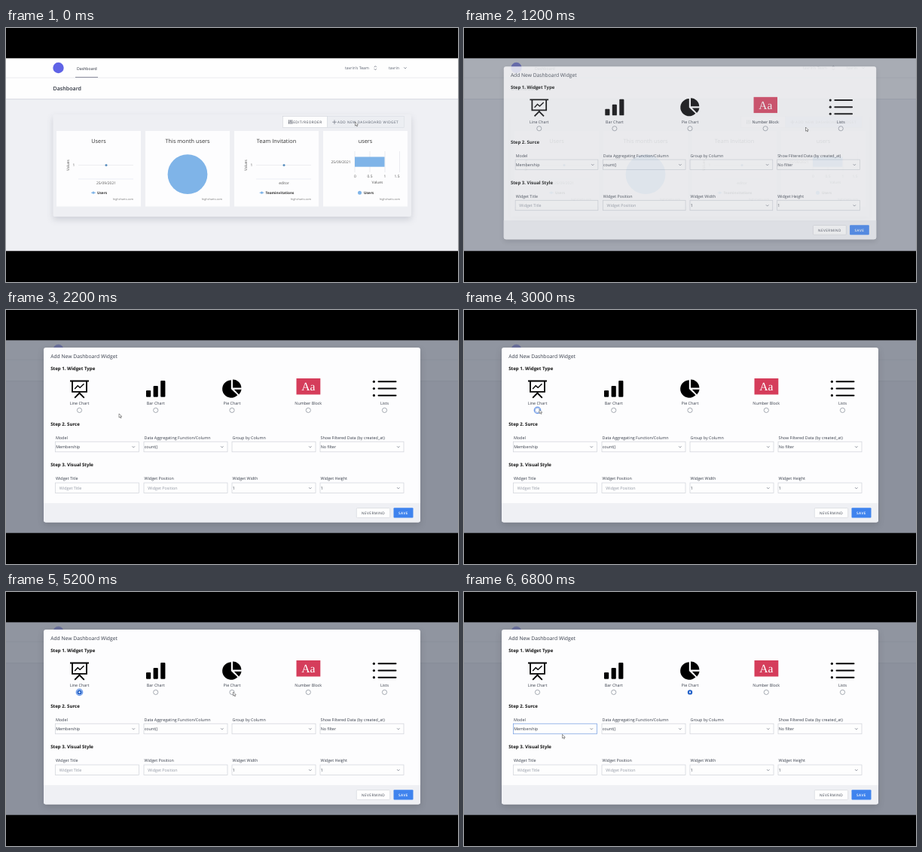
Recreate the animation shown at these times as an HTML page. Size 600 by 338 pixels, loop 8000 ms.

```html
<!DOCTYPE html>
<html lang="en">
<head>
<meta charset="utf-8">
<title>Dashboard widgets</title>
<style>
  html, body { margin: 0; width: 100%; height: 100%; overflow: hidden; background: #000; }
  svg { display: block; width: 600px; height: 338px; }
  text { font-family: "Open Sans", "Noto Sans", sans-serif; text-rendering: geometricPrecision; white-space: pre; }
  .caps { font-size: 4.7px; letter-spacing: .47px; }
  .panel { filter: drop-shadow(0 4px 4px rgba(40, 45, 70, .16)); }
  .sheet { filter: drop-shadow(0 3px 4px rgba(0, 0, 0, .14)); }
</style>
</head>
<body>
<svg id="stage" viewBox="0 0 600 338"></svg>
<script>
const LOOP = 8000, STEP = 200;
const INK = '#363c49', BLUE = '#7fb4e8', LINE = '#cfd2d9';

const text = (x, y, s, size, fill = INK, more = '') =>
  `<text x="${x}" y="${y}" font-size="${size}" fill="${fill}" ${more}>${s}</text>`;
const mid = 'text-anchor="middle"', end = 'text-anchor="end"';
const caps = (x, y, s, fill = INK, more = '') =>
  `<text class="caps" x="${x}" y="${y}" fill="${fill}" ${more}>${s}</text>`;
const rect = (x, y, w, h, fill, more = '') =>
  `<rect x="${x}" y="${y}" width="${w}" height="${h}" fill="${fill}" ${more}/>`;
const circle = (x, y, r, fill, more = '') =>
  `<circle cx="${x}" cy="${y}" r="${r}" fill="${fill}" ${more}/>`;
const path = (d, stroke, width, more = '') =>
  `<path d="${d}" fill="none" stroke="${stroke}" stroke-width="${width}" ${more}/>`;
const chevron = (x, y, r = 1.7) =>
  path(`M${x - r} ${y - r / 2}l${r} ${r}l${r} ${-r}`, '#5f6675', .7);

// Dashboard page
const card = (x, title, body) =>
  rect(x, 137, 112, 100.5, '#fdfdfe') + text(x + 56, 153, title, 7.3, '#333', mid) + body +
  text(x + 102, 229, 'highcharts.com', 3.75, '#777', end);

const dotChart = (x, label, legend, legendX) =>
  path(`M${x + 29} 182.5h73`, '#e3e4e8', .6) +
  path(`M${x + 29} 201h73`, '#dfe3ee', .6) +
  circle(x + 66, 182.5, 1.5, '#5b8fbf') +
  text(x + 23, 184.2, '1', 4.9, '#555', mid) +
  text(0, 0, 'Values', 4.9, '#555', `${mid} transform="translate(${x + 17} 182.5) rotate(-90)"`) +
  text(x + 66, 208, label, 4.9, '#555', mid) +
  path(`M${legendX - 8} 219.2h6`, BLUE, .9) + circle(legendX - 5, 219.2, 1.6, BLUE) +
  text(legendX, 221, legend, 4.7, '#333', 'font-weight="700"');

const barChart = () =>
  [463, 483, 503, 522.5].map(x => path(`M${x} 164v28`, '#e0e1e6', .6)).join('') +
  rect(463, 171.5, 39.5, 13.2, BLUE) +
  text(457.5, 180, '25/09/2021', 4.9, '#555', end) +
  ['0', '0.5', '1', '1.5'].map((s, i) => text([463.5, 483, 503, 519][i], 199, s, 4.9, '#555', mid)).join('') +
  text(493, 207, 'Values', 4.9, '#555', mid) +
  circle(469.5, 219.2, 2.5, BLUE) + text(475, 221, 'Users', 4.7, '#333', 'font-weight="700"');

const page =
  rect(0, 40, 600, 257, '#eff0f4') +
  rect(0, 94, 600, 1.2, '#dcdee4') + rect(0, 40, 600, 54, '#fefefe') + rect(0, 65.7, 600, .8, '#e6e7ec') +
  circle(69.5, 53, 7.2, '#5f63e6') +
  text(94, 55.6, 'Dashboard', 5.2, '#252b38') + rect(92, 65, 30, 1, '#8b8d9d') +
  text(450, 55.2, "tavrin's Team", 5.2, '#555c6a') +
  path('M488.7 52.2l1.6-1.6l1.6 1.6M488.7 54.2l1.6 1.6l1.6-1.6', '#555c6a', .7) +
  text(508, 55.2, 'tavrin', 5.2, '#555c6a') + chevron(530, 53.2) +
  text(62.5, 83, 'Dashboard', 7.1, '#2b303c', 'font-weight="600"') +
  rect(62.5, 115, 475.5, 136, '#eeeff3', 'class="panel" rx="2"') +
  rect(367.3, 117.6, 59, 15, '#fefefe', `stroke="${LINE}" stroke-width=".6"`) +
  path('M375.6 122.2v5.6M377.6 122.2v5.6M379.6 122.2v5.6M374.9 126h1.4M376.9 124h1.4M378.9 126h1.4', '#444a57', .7) +
  caps(381.3, 127, 'EDIT/REORDER') +
  rect(426.3, 117.6, 102, 15, '#eceef2', 'id="add" stroke="#d9dce3" stroke-width=".6"') +
  path('M433.2 125.2h5.6M436 122.4v5.6', '#555c6a', .6) +
  caps(440, 127, 'ADD NEW DASHBOARD WIDGET', '#555c6a') +
  card(67, 'Users', dotChart(67, '25/09/2021', 'Users', 121)) +
  card(185, 'This month users', circle(241, 194.7, 26.4, BLUE)) +
  card(303, 'Team Invitation', dotChart(303, 'editor', 'Teaminvitations', 344.5)) +
  card(421, 'users', barChart());

// Dialog
const COLS = [65.5, 183, 300, 417];
const TYPES = ['Line Chart', 'Bar Chart', 'Pie Chart', 'Number Block', 'Lists'];
const typeX = i => 97.5 + i * 101.25;
const RADIO_Y = 133.4;

const icons =
  path('M85 94.5h25M88 95v13.8h19v-13.8M97.5 109v3M97.5 110.5l-6.3 6.3M97.5 110.5l6.3 6.3', '#000', 1.8) +
  path('M91.2 105l4-4.2l3 2.6l5.3-5.2', '#000', 1.4) +
  rect(186, 107, 6.2, 8.8, '#000', 'rx="1"') + rect(195.6, 101, 6.2, 14.8, '#000', 'rx="1"') +
  rect(205.2, 94, 6.2, 21.8, '#000', 'rx="1"') +
  '<path d="M298.8 93.2A11.8 11.8 0 1 0 307.4 113.2L298.8 105Z"/>' +
  '<path d="M301 92.4A11.6 11.6 0 0 1 312.4 103.6H301Z"/>' +
  '<path d="M302.8 105.8H312.6A11.4 11.4 0 0 1 309.2 112.4Z"/>' +
  rect(385.5, 91, 31.8, 21.5, '#d53d5b') +
  `<text x="401.4" y="107" font-size="15.5" fill="#fff" ${mid} style="font-family:'Liberation Serif',serif">Aa</text>` +
  [95.3, 104.5, 113.7].map(y => circle(488.4, y, 1.6, '#000') +
    path(`M494.5 ${y}h23`, '#000', 2, 'stroke-linecap="round"')).join('');

const field = (i, y, label, value, isSelect, id = '') =>
  text(COLS[i] + .5, y - 3.6, label, 5.4) +
  rect(COLS[i], y, 111, 13.6, '#fefefe', `id="${id}" stroke="${LINE}" stroke-width=".7"`) +
  (isSelect ? text(COLS[i] + .7, y + 8.8, value, 5.4) + chevron(COLS[i] + 103.8, y + 7)
            : text(COLS[i] + 5.3, y + 8.8, value, 5.4, '#9298a4'));

const heading = (y, s) => text(59.2, y, s, 6.1, '#111', 'font-weight="700"');

const dialog =
  rect(50, 50, 500, 232.6, '#fdfdfe', 'class="sheet" rx="3"') +
  '<path d="M50 257H550V279.6A3 3 0 0 1 547 282.6H53A3 3 0 0 1 50 279.6Z" fill="#eff0f4"/>' +
  text(59.2, 64.2, 'Add New Dashboard Widget', 6.77) +
  heading(80.3, 'Step 1. Widget Type') + icons +
  TYPES.map((s, i) => text(typeX(i), 126.4, s, 5.4, INK, mid)).join('') +
  '<g id="radios"></g>' +
  heading(153.8, 'Step 2. Surce') +
  field(0, 175.2, 'Model', 'Membership', true, 'model') +
  field(1, 175.2, 'Data Aggregating Function/Column', 'count()', true) +
  field(2, 175.2, 'Group by Column', '', true) +
  field(3, 175.2, 'Show Filtered Data (by created_at)', 'No filter', true) +
  heading(208.4, 'Step 3. Visual Style') +
  field(0, 230, 'Widget Title', 'Widget Title', false) +
  field(1, 230, 'Widget Position', 'Widget Position', false) +
  field(2, 230, 'Widget Width', '1', true) +
  field(3, 230, 'Widget Height', '1', true) +
  rect(465.3, 263.6, 44.4, 12.8, '#fefefe', `stroke="${LINE}" stroke-width=".6" rx="1"`) +
  caps(472, 271.7, 'NEVERMIND') +
  rect(514.5, 263.3, 26, 13.3, '#3f83ee', 'rx="1"') +
  caps(521, 271.7, 'SAVE', '#fff', 'font-weight="600"');

document.getElementById('stage').innerHTML =
  rect(0, 0, 600, 338, '#000') + page +
  rect(0, 40, 600, 257, '#6b7280', 'id="shade"') +
  `<g id="dialog">${dialog}</g>` +
  '<path id="cursor" d="M0 0V5.2L1.3 4.1L2.2 6L3 5.6L2.2 3.8H3.8Z" fill="#fff" stroke="#333" stroke-width=".5"/>' +
  rect(0, 0, 600, 40.3, '#000') + rect(0, 296.7, 600, 42, '#000');

const $ = Object.fromEntries(['add', 'shade', 'dialog', 'radios', 'model', 'cursor']
  .map(id => [id, document.getElementById(id)]));

// Keys are [time, x, y]
const CURSOR = [
  [0, 463.5, 125], [1000, 464, 125], [1200, 453.5, 132], [1400, 398, 154.5],
  [1800, 270, 150], [2200, 150, 138], [2400, 123, 132.5], [2600, 100, 132.5], [4000, 100, 132.5],
  [4200, 150, 138], [4400, 270, 134], [4600, 370, 116], [4800, 394, 103], [5000, 340, 124],
  [5200, 301.5, 133], [5600, 301.5, 133], [6000, 220, 160], [6400, 133, 182], [6800, 130.5, 189.5]
];

const clamp = v => Math.max(0, Math.min(1, v));

function cursorAt(t) {
  const i = CURSOR.findIndex(k => k[0] > t);
  if (i < 0) return CURSOR.at(-1).slice(1);
  const [a, b] = [CURSOR[i - 1], CURSOR[i]];
  const p = (t - a[0]) / (b[0] - a[0]);
  return [1, 2].map(n => a[n] + (b[n] - a[n]) * p);
}

function radio(i, checked, focused) {
  const x = typeX(i);
  return (focused ? circle(x, RADIO_Y, 4.2, '#fff', 'stroke="#6d9cec" stroke-width="1.3"') : '') +
    (checked ? circle(x, RADIO_Y, 3.2, '#2563c9') + circle(x, RADIO_Y, 1.1, '#fff')
             : circle(x, RADIO_Y, 3.1, '#fff', `stroke="${focused ? '#5b7fc4' : '#6b7280'}" stroke-width=".6"`));
}

function render(t) {
  $.add.setAttribute('fill', t >= 200 ? '#dbe6f8' : '#eceef2');

  const open = 1 - (1 - clamp((t - 1000) / 380)) ** 2;
  const scale = .95 + .05 * open;
  $.shade.setAttribute('opacity', .75 * open);
  $.dialog.setAttribute('opacity', open);
  $.dialog.setAttribute('transform', `translate(300 166.3) scale(${scale}) translate(-300 -166.3)`);

  const chosen = t >= 5400 ? 2 : t >= 3200 ? 0 : -1;
  const modelFocus = t >= 6400;
  const focus = modelFocus ? -1 : t >= 5400 ? 2 : t >= 3000 ? 0 : -1;
  $.radios.innerHTML = TYPES.map((_, i) => radio(i, i === chosen, i === focus)).join('');
  $.model.setAttribute('stroke', modelFocus ? '#6f9ae0' : LINE);

  $.cursor.setAttribute('transform', `translate(${cursorAt(t)})`);
}

function frame() {
  const t = performance.now() % LOOP;
  render(Math.floor(t / STEP) * STEP);
  requestAnimationFrame(frame);
}
frame();
</script>
</body>
</html>
```
